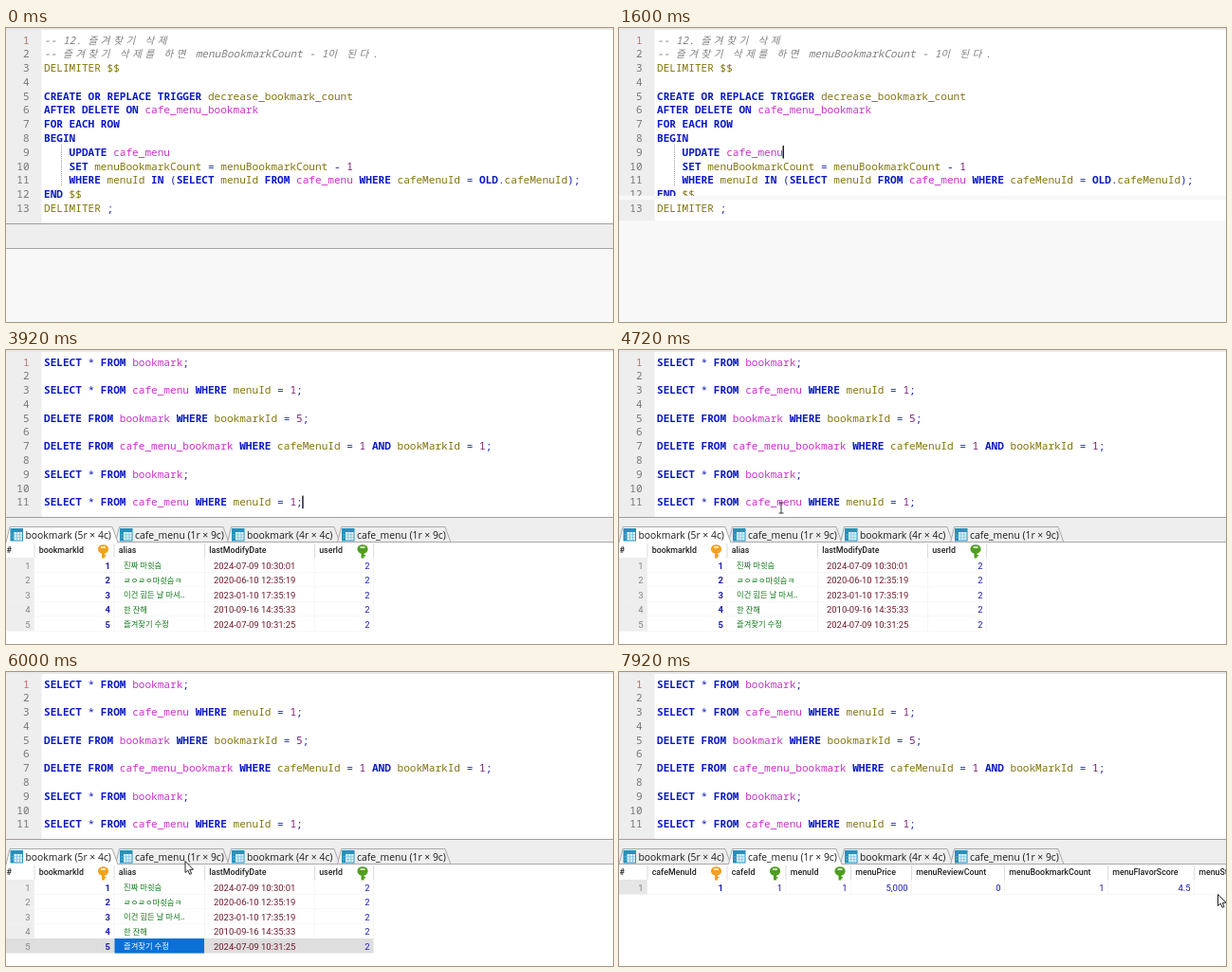
An HTML page with a canvas for the animation above (8 s loop, 640 px wide and 310 px high).

```html
<!DOCTYPE html>
<html lang="ko">
<head>
<meta charset="utf-8">
<style>
html, body { margin: 0; width: 100%; height: 100%; overflow: hidden; background: #f8f8f8; }
canvas { display: block; width: 640px; height: 310px; }
</style>
</head>
<body>
<canvas id="stage" width="640" height="310"></canvas>
<script>
const canvas = document.getElementById('stage');
const ratio = window.devicePixelRatio || 1;
canvas.width = 640 * ratio;
canvas.height = 310 * ratio;
const c = canvas.getContext('2d');

const LOOP = 8000;
const MONO = '"Noto Sans Mono", "Noto Sans CJK KR", monospace';
const UI = '"Open Sans", "Noto Sans CJK KR", sans-serif';
const GRID = 'Roboto, "Noto Sans CJK KR", "Noto Sans CJK", sans-serif';
const CELL = 6.652, LEFT = 40, PITCH = 14.77, BASE = 16.6;
const CODE = `11.09px ${MONO}`;

// Times of the hard changes
const T = { redraw: 1560, query: 1680, result: 3760, beam: 4400, arrow: 4840, pick: 5200, tab: 6320 };

const trigger = `-- 12. 즐겨찾기 삭제
-- 즐겨찾기 삭제를 하면 menuBookmarkCount - 1이 된다.
DELIMITER $$

CREATE OR REPLACE TRIGGER decrease_bookmark_count
AFTER DELETE ON cafe_menu_bookmark
FOR EACH ROW
BEGIN
    UPDATE cafe_menu
    SET menuBookmarkCount = menuBookmarkCount - 1
    WHERE menuId IN (SELECT menuId FROM cafe_menu WHERE cafeMenuId = OLD.cafeMenuId);
END $$
DELIMITER ;`.split('\n');

const queries = `SELECT * FROM bookmark;

SELECT * FROM cafe_menu WHERE menuId = 1;

DELETE FROM bookmark WHERE bookmarkId = 5;

DELETE FROM cafe_menu_bookmark WHERE cafeMenuId = 1 AND bookMarkId = 1;

SELECT * FROM bookmark;

SELECT * FROM cafe_menu WHERE menuId = 1;`.split('\n');

const keywords = new Set(('CREATE OR REPLACE TRIGGER AFTER DELETE ON FOR EACH ROW BEGIN UPDATE ' +
  'SET WHERE IN SELECT FROM OLD END AND').split(' '));
const tables = new Set(['cafe_menu_bookmark', 'cafe_menu', 'bookmark']);

function rect(x, y, w, h, color) {
  c.fillStyle = color;
  c.fillRect(x, y, w, h);
}

function text(s, x, y, font, color, align = 'left') {
  c.font = font;
  c.fillStyle = color;
  c.textAlign = align;
  c.fillText(s, x, y);
}

function shape(points, fill, stroke, close = true) {
  c.beginPath();
  points.forEach(([x, y]) => c.lineTo(x, y));
  if (close) c.closePath();
  if (fill) { c.fillStyle = fill; c.fill(); }
  if (stroke) { c.strokeStyle = stroke; c.lineWidth = 1; c.stroke(); }
}

function clipped(y, h, draw) {
  c.save();
  c.beginPath();
  c.rect(0, y, 640, h);
  c.clip();
  draw();
  c.restore();
}

function comment(line, y) {
  let col = 0;
  for (const ch of line) {
    const wide = ch >= '가';
    text(ch, LEFT + col * CELL, y, wide ? `italic 10.6px ${MONO}` : `italic ${CODE}`, '#808080');
    col += wide ? 2 : 1;
  }
}

function tokenStyle(word) {
  if (keywords.has(word)) return ['bold', '#0a18c4'];
  if (tables.has(word)) return ['500', '#c932c8'];
  if (/^\d/.test(word)) return ['500', '#782074'];
  if (/^[\w$]/.test(word)) return ['500', '#82760e'];
  return ['500', '#1a22b8'];
}

function codeLine(line, y) {
  if (line.startsWith('--')) return comment(line, y);
  for (const m of line.matchAll(/[\w$]+|[^\w\s$]/g)) {
    const [weight, color] = tokenStyle(m[0]);
    text(m[0], LEFT + m.index * CELL, y, `${weight} ${CODE}`, color);
  }
}

function editor(lines, height) {
  rect(0, 0, 640, height, '#fff');
  rect(0, 0, 37.5, height, '#eeeeee');
  rect(0, 0, 640, 2, '#e8e8e8');
  clipped(0, height, () => lines.forEach((line, i) => {
    const y = BASE + i * PITCH;
    text(i + 1, 24.6, y, CODE, i ? '#777' : '#b4736c', 'right');
    codeLine(line, y);
  }));
}

function guides() {
  for (let y = 123; y < 167; y += 2) rect(58, y, 1, 1, '#9a9a9a');
}

function caret(t, line, col) {
  if (Math.floor(t / 530) % 2) rect(LEFT + col * CELL - 0.5, BASE - 10.7 + (line - 1) * PITCH, 1.4, 13.5, '#111');
}

function bar(y) {
  rect(0, y, 640, 27, '#eeeeee');
  rect(0, y, 640, 1, '#a39d9d');
  rect(0, y + 26, 640, 1, '#a8a2a2');
}

function tableIcon(x, y) {
  rect(x, y, 13.5, 13.5, '#2592bd');
  rect(x + 4, y + 4, 8.5, 8.5, '#e4f3fa');
  for (let i = 0; i < 2; i++) {
    rect(x + 6.5 + i * 3, y + 4, 0.7, 8.5, '#6dbbdc');
    rect(x + 1, y + 6.5 + i * 3, 11.5, 0.7, '#6dbbdc');
  }
}

const tabs = [
  [0, 118, 'bookmark (5r × 4c)'], [115.5, 235, 'cafe_menu (1r × 9c)'],
  [233.5, 352, 'bookmark (4r × 4c)'], [349.5, 469, 'cafe_menu (1r × 9c)']
];

function drawTab([a, b, label], active) {
  shape([[a, 203], [a + 4, 186.5], [b - 6, 186.5], [b, 203]], active ? '#fff' : '#eeeeee', '#aaa', false);
  tableIcon(a + 4.5, 188);
  text(label, a + 20.5, 198.7, `10.35px ${UI}`, '#1c1c1c');
}

function tabBar(active) {
  rect(0, 176, 640, 27, '#eeeeee');
  rect(0, 176, 640, 1, '#a39d9d');
  tabs.forEach((tab, i) => { if (i !== active) drawTab(tab, false); });
  rect(0, 202, 640, 1, '#aaa');
  drawTab(tabs[active], true);
}

function key(x, color) {
  rect(x - 1.5, 213, 3, 6.5, color);
  rect(x, 216, 3, 1.5, color);
  c.beginPath();
  c.ellipse(x, 210, 5.6, 4.8, 0, 0, 7);
  c.fillStyle = color;
  c.fill();
  rect(x - 2.5, 207.3, 5, 1.5, '#fff');
}

// Columns: [left edge, title, key colour]
function header(cols, right) {
  rect(0, 203, 640, 107, '#fff');
  const font = `500 8.85px ${GRID}`;
  text('#', 0.5, 214, font, '#222');
  cols.forEach(([x, title, color], i) => {
    rect(x - 0.5, 204, 1, 15, '#dcdcdc');
    text(title, x + 4.7, 214, font, '#222');
    const end = i + 1 < cols.length ? cols[i + 1][0] : right;
    if (color) key(end - 11.5, color);
  });
  rect(right - 0.5, 204, 1, 15, '#dcdcdc');
}

function cell(s, x, y, color, align = 'right', weight = '') {
  text(s, x, y, `${weight} 9.45px ${GRID}`, color, align);
}

const ORANGE = '#f5a11d', GREEN = '#4d9f1c', NAVY = '#1c1cae', ROW_TOP = 219, ROW = 15.5;
const markCols = [[30, 'bookmarkId', ORANGE], [114, 'alias'], [209.5, 'lastModifyDate'], [325.5, 'userId', GREEN]];
const markRows = [
  ['진짜 마쉿슴', '2024-07-09 10:30:01'], ['ㄹㅇㄹㅇ마쉿슴ㅋ', '2020-06-10 12:35:19'],
  ['이건 힘든 날 마셔..', '2023-01-10 17:35:19'], ['한 잔해', '2010-09-16 14:35:33'],
  ['즐겨찾기 수정', '2024-07-09 10:31:25']
];
const menuCols = [[30, 'cafeMenuId', ORANGE], [114, 'cafeId', GREEN], [176, 'menuId', GREEN], [244.5, 'menuPrice'],
  [308.5, 'menuReviewCount'], [406.5, 'menuBookmarkCount'], [515.5, 'menuFlavorScore'], [606.5, 'menuStatus']];
const menuRow = ['1', '1', '1', '5,000', '0', '1', '4.5'];

function rowLines(cols, y, right) {
  rect(0, y + 15, right, 0.6, '#f3f3f3');
  [...cols.map(col => col[0]), right].forEach(x => rect(x - 0.5, y, 0.7, ROW, '#f3f3f3'));
}

function markGrid(picked) {
  header(markCols, 387.5);
  markRows.forEach(([alias, date], i) => {
    const y = ROW_TOP + i * ROW, base = y + 11.5;
    const on = picked && i === 4;
    rect(0, y, 30, ROW, on ? '#dedede' : '#eeeeee');
    if (on) rect(30, y, 357.5, ROW, '#dedede');
    else rowLines(markCols, y, 387.5);
    if (on) rect(114.5, y, 94.5, ROW, '#0b6fd6');
    cell(i + 1, 25.5, base, '#858585');
    cell(i + 1, 110, base, NAVY, 'right', 'bold');
    text(alias, 124, base - 0.5, `500 8.3px ${GRID}`, on ? '#fff' : '#107818');
    cell(date, 219, base, '#6e1a2c', 'left');
    cell('2', 383.5, base, NAVY);
  });
}

function menuGrid() {
  header(menuCols, 700);
  rect(0, ROW_TOP, 30, ROW, '#e6e6e6');
  rowLines(menuCols, ROW_TOP, 700);
  cell('1', 25.5, ROW_TOP + 11.5, '#858585');
  menuRow.forEach((v, i) => cell(v, menuCols[i + 1][0] - 4, ROW_TOP + 11.5, NAVY, 'right', i ? '' : 'bold'));
}

function tooltip(alpha) {
  if (alpha <= 0) return;
  c.save();
  c.globalAlpha = alpha;
  shape([[61.5, 211.5], [174.5, 211.5], [174.5, 203], [184, 211.5], [307.5, 211.5], [307.5, 259.5], [61.5, 259.5]], '#f9f9f9', '#e2e2e2');
  const font = `11.1px ${UI}`;
  text('9 columns × 1 rows', 63.5, 225.2, font, '#585858');
  text('SELECT * FROM cafe_menu WHERE menuId = 1', 63.5, 254.8, font, '#585858');
  c.restore();
}

const clamp = v => Math.max(0, Math.min(1, v));

// Pointer stops: [time, x, y]
const stops = [[4400, 171, 166], [4740, 171, 166], [5120, 158, 286], [5560, 158, 286], [5960, 188.5, 199],
  [6080, 188.5, 199], [6280, 175, 197], [6720, 175, 197], [6880, 155.5, 247], [7080, 162, 270],
  [7300, 180, 270], [7840, 631, 234], [8000, 631, 234]];

function pointerAt(t) {
  const i = stops.findIndex(s => s[0] > t);
  const [t0, x0, y0] = stops[i - 1], [t1, x1, y1] = stops[i];
  const u = (t - t0) / (t1 - t0), e = u * u * (3 - 2 * u);
  return [x0 + (x1 - x0) * e, y0 + (y1 - y0) * e];
}

function pointer(t) {
  const [x, y] = pointerAt(t);
  if (t < T.arrow) {
    rect(x - 0.5, y - 5, 1, 11, '#333');
    rect(x - 2.5, y - 5.5, 5, 1, '#333');
    rect(x - 2.5, y + 5.5, 5, 1, '#333');
    return;
  }
  shape([[0, 0], [0, 12], [2.8, 9.6], [4.7, 13.8], [6.6, 13], [4.8, 8.9], [8.5, 8.7]]
    .map(([dx, dy]) => [x + dx + 0.5, y + dy + 0.5]), '#fff', '#222');
}

function draw(t) {
  c.setTransform(ratio, 0, 0, ratio, 0, 0);
  rect(0, 0, 640, 310, '#f8f8f8');
  if (t < T.query) {
    editor(trigger, 206);
    guides();
    caret(t, 9, 20);
    if (t < T.redraw) bar(206);
    else {
      rect(0, 177, 640, 4, '#f8f8f8');
      rect(0, 203, 640, 107, '#f8f8f8');
    }
    return;
  }
  editor(queries, 176);
  if (t < T.pick) caret(t, 11, 41);
  if (t < T.result) return bar(176);

  const menu = t >= T.tab;
  if (menu) menuGrid();
  else markGrid(t >= T.pick);
  tabBar(menu ? 1 : 0);
  if (menu) tooltip(Math.min(clamp((t - 6480) / 160), clamp((7080 - t) / 280)));
  if (t >= T.beam) pointer(t);
}

const start = performance.now();
function tick() {
  draw((performance.now() - start) % LOOP);
  requestAnimationFrame(tick);
}
tick();
</script>
</body>
</html>
```
